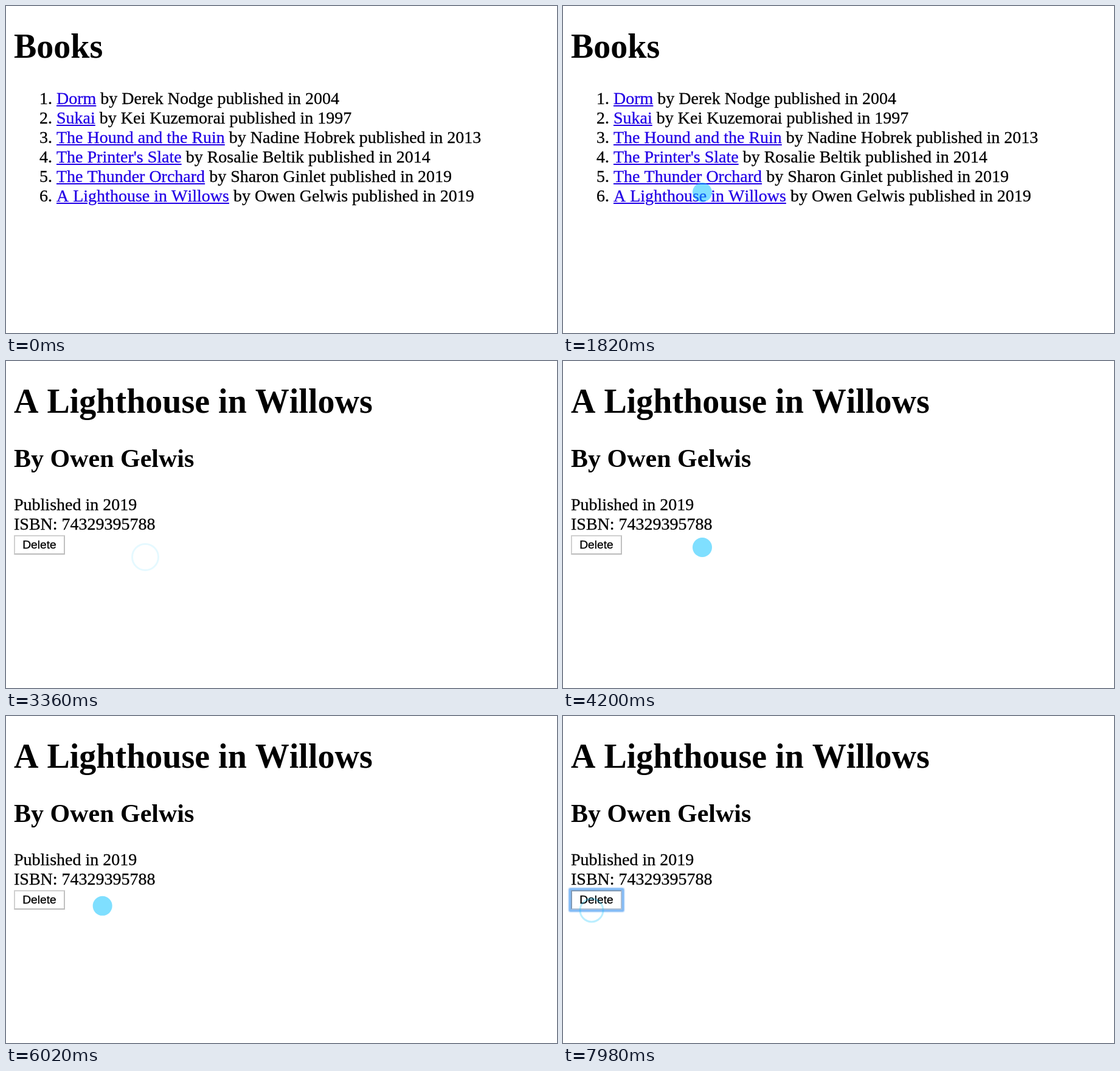
These frames come from a looping animation (906x537 px, 8000 ms). An HTML page:

```html
<!DOCTYPE html>
<html lang="en">
<head>
<meta charset="utf-8">
<title>Books</title>
<style>
  html, body { margin: 0; width: 100%; height: 100%; overflow: hidden; background: #fff; }
  body {
    position: relative; color: #000; white-space: nowrap;
    font: 28px/32px "Liberation Serif", Times, serif; font-kerning: none;
  }
  .page, .pointer { position: absolute; left: 0; top: 0; width: 906px; height: 537px; overflow: hidden; }
  h1, h2, ol, p, .button { position: absolute; left: 13px; margin: 0; }
  h1 { top: 35px; font-size: 56px; line-height: 62px; }
  h2 { top: 137px; font-size: 42px; line-height: 46px; }
  ol { top: 136px; padding-left: 70px; }
  p { top: 220px; }
  ol, p, .button { -webkit-text-stroke: .3px; }
  u { color: #2200e6; text-decoration-thickness: 2px; text-underline-offset: 2px; }
  .button {
    top: 286px; width: 84px; height: 32px; box-sizing: border-box;
    border: 2px solid; border-color: #d0d0d0 #c0c0c0 #bababa #d0d0d0;
    font: 19.25px/28px "Liberation Sans", Arial, sans-serif; text-align: center;
  }
  .focused {
    border-color: #7f99b5 #a9bdd3 #a9bdd3 #7f99b5; border-radius: 1px;
    box-shadow: 0 0 0 3px #84bbf5, 0 0 2px 4px #93c3f7;
  }
  #dot { fill: #00bfff; fill-opacity: .5; }
  #ring { fill: none; stroke: #00bfff; stroke-width: 3px; }
</style>
</head>
<body>
<div class="page" id="list">
  <h1>Books</h1>
  <ol>
    <li><u>Dorm</u> by Derek Nodge published in 2004</li>
    <li><u>Sukai</u> by Kei Kuzemorai published in 1997</li>
    <li><u>The Hound and the Ruin</u> by Nadine Hobrek published in 2013</li>
    <li><u>The Printer's Slate</u> by Rosalie Beltik published in 2014</li>
    <li><u>The Thunder Orchard</u> by Sharon Ginlet published in 2019</li>
    <li><u>A Lighthouse in Willows</u> by Owen Gelwis published in 2019</li>
  </ol>
</div>
<div class="page" id="detail">
  <h1>A Lighthouse in Willows</h1>
  <h2>By Owen Gelwis</h2>
  <p>Published in 2019<br>ISBN: 74329395788</p>
  <div class="button" id="delete">Delete</div>
</div>
<svg class="pointer" viewBox="0 0 906 537">
  <circle id="dot" r="16"/>
  <circle id="ring"/>
</svg>
<script>
  const LOOP = 8000, STEP = 140;
  const ENTER = 700, OPEN_CLICK = 3080, OPEN = 3360, DRIFT = 5460, DELETE_CLICK = 7980;
  const RING_STEPS = 3;

  const byId = id => document.getElementById(id);
  const [list, detail, button, dot, ring] = ["list", "detail", "delete", "dot", "ring"].map(byId);

  const progress = (time, start, steps) =>
    Math.min(1, Math.max(0, (time - start) / (steps * STEP)));
  const show = (element, visible) => { element.style.visibility = visible ? "visible" : "hidden"; };
  const set = (element, attributes) => {
    for (const name in attributes) element.setAttribute(name, attributes[name]);
  };

  // The pointer slows down onto the link, then drifts to the button in a shallow dip.
  function pointerAt(time) {
    const left = (1 - progress(time, ENTER, 8)) ** 2.2;
    const drift = Math.sin(Math.PI / 2 * progress(time, DRIFT, 11) ** 1.36);
    const dip = Math.sin(Math.PI * progress(time, DRIFT, 8)) ** 2;
    return { cx: 229 + 311 * left - 182 * drift, cy: 306 + 219 * left - 3 * drift + 7 * dip };
  }

  function draw(now) {
    const time = Math.floor(now % LOOP / STEP) * STEP;
    const { cx, cy } = pointerAt(time);
    const clickAge = (time - (time < DELETE_CLICK ? OPEN_CLICK : DELETE_CLICK)) / STEP;
    const clicking = clickAge >= 0 && clickAge < RING_STEPS;

    show(list, time < OPEN);
    show(detail, time >= OPEN);
    button.classList.toggle("focused", time >= DELETE_CLICK);

    show(dot, time >= ENTER && !clicking);
    set(dot, { cx, cy });
    show(ring, clicking);
    if (clicking) {
      set(ring, { cx, cy: cy + 16, r: 19 + 1.25 * clickAge, opacity: .27 - .085 * clickAge });
    }
  }

  const start = performance.now();
  function tick() {
    draw(performance.now() - start);
    requestAnimationFrame(tick);
  }
  tick();
</script>
</body>
</html>
```
